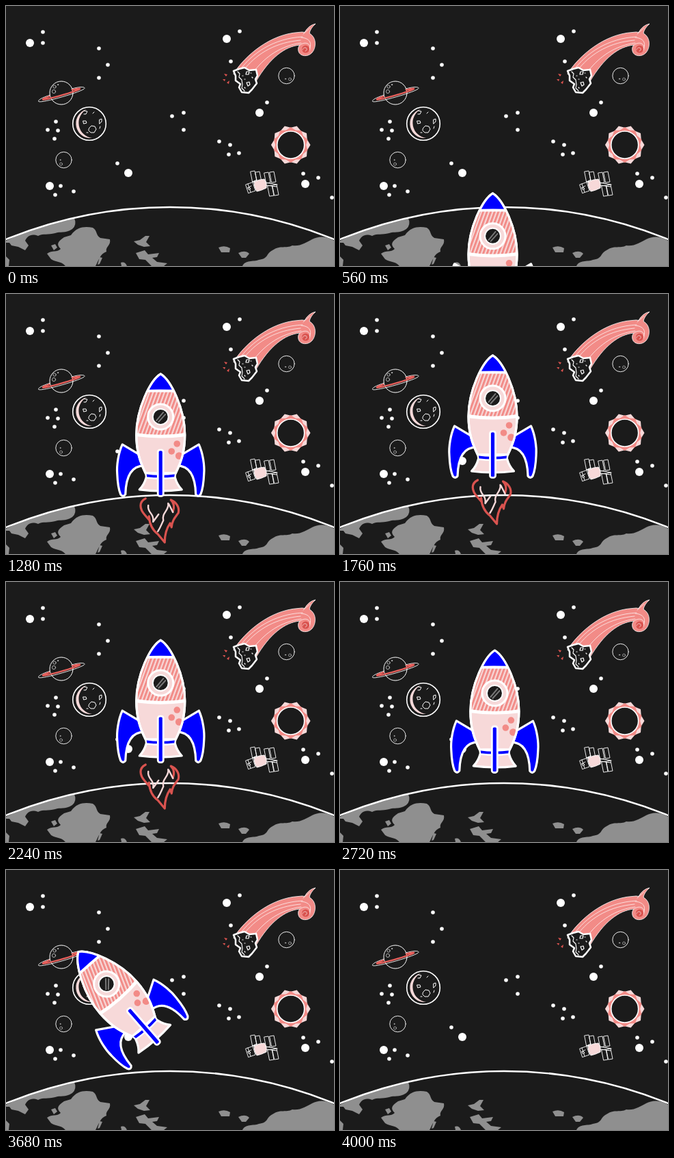
An HTML page for the animation above (5.8 s loop, 480x380 px).

```html
<!DOCTYPE html>
<html lang="en">
<head>
<meta charset="utf-8">
<title>Rocket</title>
<style>
  html, body { margin: 0; width: 100%; height: 100%; overflow: hidden; background: #1b1b1b; }
  svg { display: block; width: 480px; height: 380px; }
  .dark { fill: #1b1b1b; }
  .pale { fill: #f7d9d9; }
  .pink { fill: #f28b87; }
  .red { fill: #d9534f; }
  .blue { fill: #00f; }
  .white { fill: #fff; }
  .line { stroke: #fff; stroke-linejoin: round; stroke-linecap: round; }
  .none { fill: none; }
</style>
</head>
<body>
<svg viewBox="0 0 480 380">
  <defs>
    <pattern id="stripes" width="5.2" height="8" patternUnits="userSpaceOnUse" patternTransform="rotate(20)">
      <rect width="5.2" height="8" class="pale"/>
      <rect width="3" height="8" class="pink"/>
    </pattern>
    <path id="hull" d="M0-91C15-82 35.500-40 35.500-2C35.500 22 30 38 22 54H-22C-30 38-35.500 22-35.500-2C-35.500-40-15-82 0-91Z"/>
    <clipPath id="hullClip"><use href="#hull"/></clipPath>
    <path id="fin" d="M29 28L56 12C62 25 64.500 43 63.500 55C63 68 61 79 58.500 85Q55 90 51.500 85C51 66 46 43 24 43Z"/>
  </defs>

  <g id="stars" class="white"></g>

  <!-- ringed planet -->
  <g class="line" stroke-width="1">
    <circle cx="81" cy="127" r="17" class="dark"/>
    <g class="none" stroke-width=".6">
      <circle cx="71" cy="118" r="2.2"/><circle cx="70" cy="125" r="2.6"/><circle cx="76" cy="115" r=".7"/>
    </g>
    <g transform="rotate(-16 81 128.5)" class="none">
      <path d="M64.500 125.500C50 126 45 128 46 130C49 134 113 134 116 130C117 127.500 109 125.500 97.500 125.500" stroke-width=".8"/>
      <path d="M63 127.200C57 127.600 52 128 53 129C60 131 102 131 109 129C110 128 105 127.200 98 127.200" stroke="#e8605c" stroke-width="2.400"/>
    </g>
  </g>

  <!-- moon -->
  <g class="line none">
    <circle cx="122" cy="172" r="24.300" class="dark" stroke-width="1.600"/>
    <path d="M118 151A21.500 21.500 0 0 0 121 193H126A22.500 22.500 0 0 1 118 151Z" class="pale" stroke="none"/>
    <path d="M122 178l3-3l5 1l2 4l-3 5l-5 0l-3-3ZM137 166l3-1l0 4l-3 3ZM113 168l4 0l1 3l-4 1ZM127 157l2-2M114 153l5 1l-2 4l-3 0M138 176l-1 3M118 185l2 0" stroke-width="1"/>
  </g>

  <g class="line none" stroke-width=".9">
    <circle cx="84.500" cy="225" r="11.700"/><circle cx="410.500" cy="102" r="11.700"/>
    <g stroke-width=".5">
      <circle cx="80.500" cy="231" r="2"/><circle cx="79.500" cy="225" r=".6"/>
      <circle cx="415.500" cy="107" r="2"/><circle cx="409" cy="106.500" r=".7"/>
    </g>
  </g>

  <!-- sun -->
  <g transform="translate(416.700 203)">
    <polygon id="rays" class="pale"/>
    <polygon id="flares" class="pink"/>
    <circle r="20" class="dark line" stroke-width="1.700"/>
  </g>

  <!-- comet -->
  <path class="pink line" stroke-width=".8" d="M333 99C350 72 387 41 428 38.500Q434 37.500 437 38.500Q443 28 453 26Q445 33 444 40C455 46 454 61 448 68C442 75 430 74 428 66C427 62 428 59 430 57C408 59 386 76 366 110Z"/>
  <path class="line none" stroke-width=".7" d="M342 94C360 69 392 47 434 45M350 91C369 68 396 53 431 50M364 94C380 74 402 58 432 54M432 46C445 47 448 55 444 62M430 57C440 50 448 57 444 65M435 41L445 32"/>
  <circle cx="438.500" cy="63" r="5.500" class="red"/>
  <path class="line none" stroke-width=".6" d="M434 64q1-4 5-3q3 3-1 5"/>
  <path class="dark line" stroke-width="2.500" d="M333 95L341 92L349 90L356 94L366 93L368 102L365 107L367 113L360 122L355 127L345 126L341 119L343 114L336 109L336 102Z"/>
  <path class="line none" stroke-width="1.200" d="M339 96l3 3l-1 5l4 4l1 7l-1 5l4 4M352 96l4 0l-1 4l-4 0ZM352 112l4-1l1 4l-3 2ZM346 102l1 0M360 104l1 1M358 98l1 0M349 107l1 0M349 119l1 1"/>
  <path class="red" d="M319 99l5 1l-2 3ZM317 107l4 0l-1 3ZM323 112l4-3l-1 5Z"/>

  <!-- satellite -->
  <g class="line" stroke-width=".9">
    <path id="panels" class="none"/>
    <path class="none" d="M361 257L367 254M380 258L397 261M381 262L396 264" stroke-width="1.200"/>
    <path class="dark" d="M351 261L361 257.500L365 270L355 273.500ZM354 260L358 272M353 266L359 263"/>
    <path class="pale" d="M363 257.500Q370 253 378 253Q382 258 381 266Q373 270 367 271Q363 265 363 257.500Z"/>
    <circle cx="356" cy="267" r="1.500" class="dark"/>
  </g>

  <!-- globe -->
  <circle cx="240" cy="930" r="636" class="dark"/>
  <path fill="#8f8f8f" d="M0 343Q50 318 100 310Q104 320 97 326C86 333 79 329 72 332C61 335 55 332 47 336C36 332 31 337 28 343L33 350L28 357L18 352L8 350L5 346H0Z
    M95 335C104 322 116 322 127 324C134 328 131 335 138 339L152 341C154 350 145 352 147 359C138 362 136 371 131 380H87C80 372 73 375 66 370L60 362C68 356 74 361 80 355C73 348 76 344 85 338Z
    M66 350l6-2l3 5l-5 4Z M137 367l4 1l-4 9l-3 1Z M168 375q6-2 9 5h-8Z M0 366l5 5l-1 9H0Z
    M187 344L196 342L204 336L210 336L205 345L211 351L202 352L193 349Z
    M190 361L203 357L208 363L224 361L221 367L214 368L221 374L236 376L231 380H213L204 371L195 370Z
    M311 353Q320 349 328 354L327 360H315Z M340 361Q350 356 356 362L351 368H345Z
    M346 380C350 371 362 374 370 371C385 369 380 362 390 357C402 349 410 355 419 350C430 352 440 345 448 341C458 336 468 336 480 343V380Z"/>
  <circle cx="240" cy="930" r="636" class="line none" stroke-width="2.400"/>

  <g id="rocket">
    <g id="flame" class="none" stroke-linecap="round" stroke-linejoin="round">
      <path stroke="#d9534f" stroke-width="3.200" d="M-22 91C-32 96-31 106-23 115L-17 122L-17 117C-16 131-11 138-4 143L6 155C6 146 7 137 14 127L16 133C17 122 22 118 26 112C28 104 23 96 15 93C21 99 20 105 18 110"/>
      <path stroke="#f7d9d9" stroke-width="2.400" d="M-18 101C-20 112-9 112-11 125L-3 114M11 98C13 108 1 112 4 123C1 129 0 133-4 139M12 99L18 111"/>
    </g>
    <g class="line" stroke-width="3.200">
      <use href="#fin" class="blue"/>
      <use href="#fin" class="blue" transform="scale(-1 1)"/>
      <path class="pale" d="M-21 60Q-24 71-31 78Q0 82 31 78Q24 71 21 60Z"/>
      <use href="#hull" class="pale"/>
      <g clip-path="url(#hullClip)">
        <path fill="url(#stripes)" d="M-40-66H40V-2Q0 4-40-2Z"/>
        <path class="blue" d="M-40-95H40V-66Q0-68-40-66Z" stroke-width="2.800"/>
        <path class="none" d="M-40-4Q0 3 40-4"/>
        <g class="pink" stroke="none">
          <circle cx="24" cy="11" r="4.800"/><circle cx="16" cy="22" r="4.800"/><circle cx="27" cy="28.500" r="5.300"/>
        </g>
      </g>
      <use href="#hull" class="none"/>
      <path class="blue" stroke-width="2.400" d="M-22 54Q0 57 22 54L21 60.500Q0 63-21 60.500Z"/>
      <circle cy="-28.500" r="18.500" class="pale" stroke-width="3"/>
      <circle cy="-28.500" r="11.500" class="dark" stroke-width="2"/>
      <path d="M-6-23L4-35M-3-21L7-32" style="stroke:#777" stroke-width="2"/>
      <rect x="-4" y="20" width="8" height="67.500" rx="3" class="blue" stroke-width="2.800"/>
    </g>
  </g>
</svg>
<script>
const LOOP = 5800;
const $ = id => document.getElementById(id);

const bigStars = [[35,54],[323,48],[371,156],[179,244],[64,263],[438,260]];
const smallStars = [[54,38],[54,54],[136,62],[149,86],[136,105],[342,37],[329,81],[382,141],[73,169],
  [61,181],[76,182],[71,194],[243,161],[260,156],[260,181],[312,198],[328,203],[326,217],[341,215],
  [163,230],[80,263],[72,276],[99,271],[435,245],[457,251],[477,280]];
const dots = (list, r) => list.map(([x, y]) => `<circle cx="${x}" cy="${y}" r="${r}"/>`).join('');
$('stars').innerHTML = dots(bigStars, 6) + dots(smallStars, 2.8);

const burst = (n, even, odd) => Array.from({length: 2 * n}, (_, i) => {
  const a = Math.PI * i / n, r = i % 2 ? odd : even;
  return [r * Math.cos(a), r * Math.sin(a)];
}).join(' ');
$('rays').setAttribute('points', burst(10, 28.8, 25.3));
$('flares').setAttribute('points', burst(10, 22.5, 26));

$('panels').setAttribute('d', [[358,242],[365,243],[378,244],[386,243],[383,263],[390,262]]
  .map(([x, y]) => `M${x} ${y}l6-1l3 15l-6 1z`).join(''));

// height of the nose over time while flying
const climb = [[300,384],[840,152],[880,141],[1280,115],[1760,88],[2080,77],[2640,98]];
function noseY(t) {
  const i = climb.findIndex(k => k[0] > t);
  if (i < 0) return 98;
  if (i === 0) return 384;
  const [t0, y0] = climb[i - 1], [t1, y1] = climb[i];
  return y0 + (y1 - y0) * (t - t0) / (t1 - t0);
}

const TILT = 4.4, SWING = 75, X = 226.5, NOSE = 93, REST_Y = 98 + NOSE;
const swingX = angle => X - SWING * Math.sin(angle * Math.PI / 180);

function pose(t) {
  if (t < 2680) {
    const shake = Math.sin(2 * Math.PI * ((t - 1280) / 150 + .557));
    const x = t < 2100 ? 228 + 4.5 * shake : X + shake;
    return [x, noseY(t) + NOSE, 0];
  }
  if (t < 3360) {
    const u = Math.min(1, Math.max(0, (t - 2720) / 240));
    const angle = TILT * Math.sin(1.5 * Math.PI * u);
    return [swingX(angle), REST_Y, angle];
  }
  // topple left: a short lift, then the drop
  const u = (t - 3360) / 600;
  const turn = u ** 3 * (6 * u * u - 15 * u + 10), drop = u * u * (2.25 * u - 1.25);
  const x0 = swingX(-TILT);
  return [x0 + (115 - x0) * turn, REST_Y + 223 * drop, -TILT - 65 * turn];
}

function draw(t) {
  const shown = t >= 310 && t < 4000;
  $('rocket').style.display = shown ? '' : 'none';
  if (!shown) return;
  const [x, y, angle] = pose(t);
  $('rocket').setAttribute('transform', `translate(${x} ${y}) rotate(${angle})`);
  $('flame').style.display = t < 2670 ? '' : 'none';
}

const start = performance.now();
function tick() {
  draw((performance.now() - start) % LOOP);
  requestAnimationFrame(tick);
}
tick();
</script>
</body>
</html>
```
